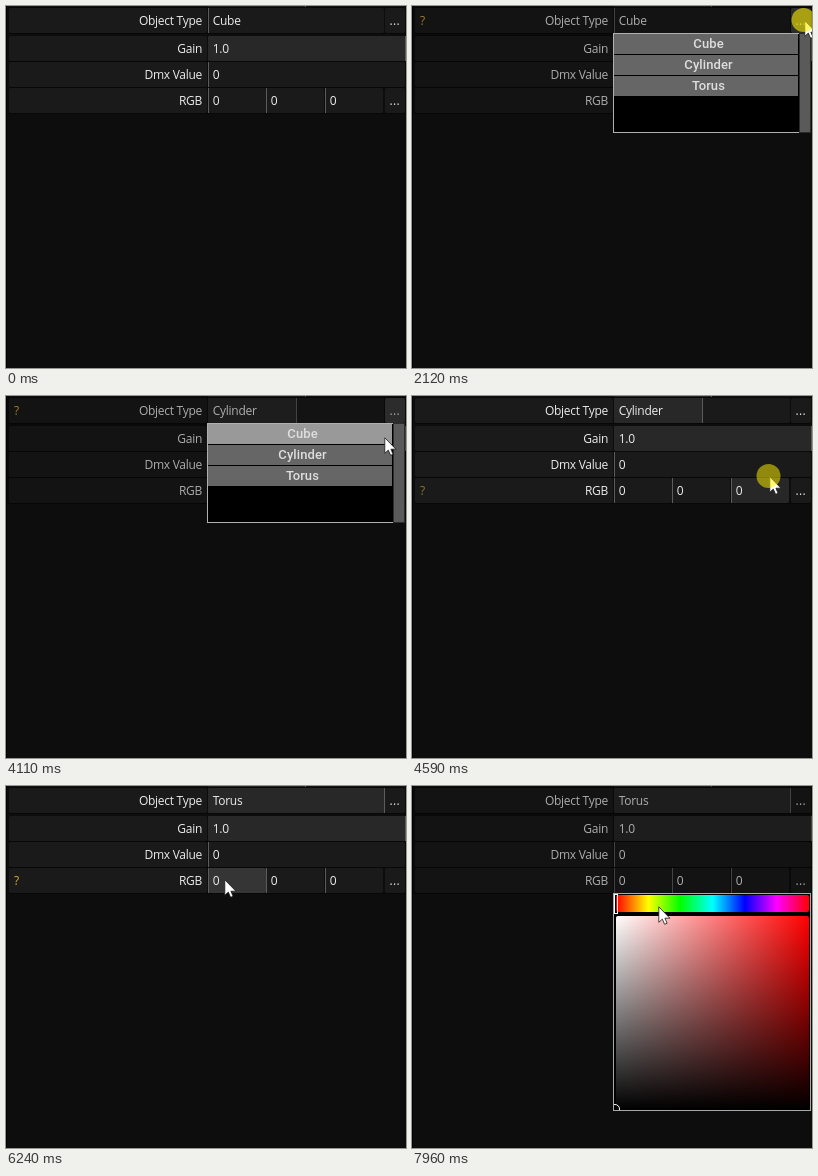
These frames come from a looping animation (400 by 362 pixels, 8 s). An HTML page:

```html
<!DOCTYPE html>
<html lang="en">
<head>
<meta charset="utf-8">
<title>Property panel</title>
<style>
  html, body { margin: 0; width: 100%; height: 100%; overflow: hidden; background: #0d0d0d; }
  svg { display: block; width: 400px; height: 362px; }
  text { font: 500 12px "Open Sans", "Noto Sans", sans-serif; letter-spacing: -.27px; fill: #ececec; }
  .label { text-anchor: end; }
  .help { fill: #dfab2f; }
  .dots { letter-spacing: .35px; }
  .item { font: 500 13px Roboto, sans-serif; letter-spacing: .1px; fill: #dedede; text-anchor: middle; }
</style>
</head>
<body>
<svg id="stage" viewBox="0 0 400 362">
  <defs>
    <linearGradient id="hue">
      <stop offset="0" stop-color="#f00"/><stop offset=".167" stop-color="#ff0"/>
      <stop offset=".333" stop-color="#0f0"/><stop offset=".5" stop-color="#0ff"/>
      <stop offset=".667" stop-color="#00f"/><stop offset=".833" stop-color="#f0f"/>
      <stop offset="1" stop-color="#f00"/>
    </linearGradient>
    <linearGradient id="sat"><stop offset="0" stop-color="#fff"/><stop offset="1" stop-color="#f00"/></linearGradient>
    <linearGradient id="val" x2="0" y2="1">
      <stop offset="0" stop-color="#000" stop-opacity="0"/><stop offset="1" stop-color="#000"/>
    </linearGradient>
    <clipPath id="pickerClip"><rect x="202" y="108" width="196" height="216"/></clipPath>
  </defs>
</svg>
<script>
const stage = document.getElementById('stage');
const LOOP = 8000, START = 610, TICK = 79.03;

function add(tag, attrs, parent = stage, content) {
  const el = document.createElementNS('http://www.w3.org/2000/svg', tag);
  for (const name in attrs) el.setAttribute(name, attrs[name]);
  if (content) el.textContent = content;
  return parent.appendChild(el);
}
const rect = (x, y, width, height, fill, parent, rx = 0) =>
  add('rect', { x, y, width, height, fill, rx }, parent);
const text = (x, y, content, cls, parent) => add('text', { x, y, class: cls }, parent, content);
const group = () => add('g', {});
const show = (el, on) => el.setAttribute('visibility', on ? 'visible' : 'hidden');
const fade = (el, amount) => el.setAttribute('opacity', amount);

// Panel rows
rect(0, 0, 1, 362, '#020202');
rect(3, 0, 396, 1, '#161616');
rect(202, 0, 97, 1, '#262626');
rect(299, 0, 1, 1, '#666');
rect(3, 1, 396, 1, '#070707');

const helps = [], fields = [];
let typeFill, typeLine, typeText;

function field(row, x, y, w, value, level) {
  rect(x, y, w, 25, '#1a1a1a', stage, 2);
  const fill = rect(x, y, w * level, 25, '#282828', stage, 1);
  const glow = rect(x, y, w, 25, '#353535', stage, 2);
  const line = rect(x + w * level, y, 1, 25, '#5c5c5c');
  const label = text(x + 4.7, y + 17, value, 'value');
  fields.push({ row, x, w, glow });
  return [fill, line, label];
}

function button(row, y) {
  rect(379, y, 20, 25, '#1a1a1a', stage, 2);
  fields.push({ row, x: 379, w: 21, glow: rect(379, y, 20, 25, '#3c3c3c', stage, 2) });
  text(383.5, y + 17, '...', 'dots');
}

const ROW_Y = [2, 30, 56, 82];
['Object Type', 'Gain', 'Dmx Value', 'RGB'].forEach((name, row) => {
  const y = ROW_Y[row];
  rect(3, y, 198, 25, '#1a1a1a', stage, 2);
  rect(3, y + 25, 396, 1, '#080808');
  text(196, y + 17, name, 'label');
  helps.push(text(8, y + 17, '?', 'help'));
});
[typeFill, typeLine, typeText] = field(0, 202, 2, 176, 'Cube', 0);
button(0, 2);
field(1, 202, 30, 197, '1.0', 1);
field(2, 202, 56, 197, '0', 0);
for (const x of [202, 260, 319]) field(3, x, 82, 58, '0', 0);
button(3, 82);

const dim = rect(0, 0, 400, 108, '#000');

// Drop-down list
const types = ['Cube', 'Cylinder', 'Torus'];
const menu = group();
rect(201, 27, 187, 100, '#b0b0b0', menu);
rect(202, 28, 185, 98, '#000', menu);
rect(387, 27, 12, 100, '#2c2c2c', menu);
rect(388, 28, 10, 98, '#5a5a5a', menu);
const items = types.map((name, i) => {
  const bar = rect(202, 28 + 21 * i, 184, 20, '#666', menu);
  text(296.5, 42 + 21 * i, name, 'item', menu);
  return bar;
});

// Colour picker
const picker = group();
rect(201, 107, 198, 218, '#a8a8a8', picker);
rect(202, 108, 196, 216, '#000', picker);
rect(204, 109, 193, 17, 'url(#hue)', picker, 2);
rect(204, 130, 193, 194, 'url(#sat)', picker, 2);
rect(204, 130, 193, 194, 'url(#val)', picker);
add('rect', { x: 202.5, y: 108.5, width: 3, height: 19, fill: 'none', stroke: '#fff' }, picker);
add('circle', { cx: 203, cy: 323, r: 4.5, fill: 'none', stroke: '#fff', 'clip-path': 'url(#pickerClip)' }, picker);

// Pointer with its click mark
const pointer = group();
add('path', {
  d: 'M.8.8V16.3L4.3 13.1 6.6 18.3 9.1 17.3 6.9 12.2H11.9Z',
  fill: '#fff', stroke: '#1a1a1a', 'stroke-width': .8
}, pointer);
const mark = add('circle', { cx: -.5, cy: 0, r: 12, fill: '#fff000' }, pointer);

// Pointer path: tick, x, y
const PATH = [
  [0, 4, 13], [10, 390, 15], [11, 391, 14], [15, 391, 14], [16, 392, 14],
  [24, 392, 14], [29, 366, 56], [32, 366, 56], [38, 390, 15], [41, 390, 15],
  [44, 378, 41], [48, 357, 80], [55, 357, 80], [56, 356, 80], [60, 356, 80],
  [71, 218, 93], [73, 216, 93], [75, 216, 93], [81, 390, 98], [88, 390, 98], [93, 246, 120]
];
const PRESSES = [18, 29, 39, 48, 83];

const between = (k, a, b) => k >= a && k < b;
const menuOpen = k => between(k, 18, 30) || between(k, 40, 49);
const pickerOpen = k => k >= 84;

function pointerAt(k) {
  const i = PATH.findIndex(p => p[0] >= k);
  if (i < 0) return PATH[PATH.length - 1].slice(1);
  if (i === 0) return PATH[0].slice(1);
  const [k0, x0, y0] = PATH[i - 1], [k1, x1, y1] = PATH[i];
  let u = (k - k0) / (k1 - k0);
  if (k1 - k0 > 5) u = u * u * (3 - 2 * u);
  return [Math.round(x0 + (x1 - x0) * u), Math.round(y0 + (y1 - y0) * u)];
}

function hoverAt(k) {
  if (k < 0 || k === 30 || k === 49) return { row: -1, x: 0 };
  if (menuOpen(k)) return { row: 0, x: 390 };
  const [x, y] = pointerAt(k);
  return { row: [28, 55, 80, 108].findIndex(end => y < end), x };
}

function draw(t) {
  const k = Math.floor((t - START) / TICK + .01);
  const [x, y] = pointerAt(k);

  // Highlights ease over two ticks and wait while the pointer rests
  const g = between(k, 50, 61) ? 50 : k;
  const hovers = [hoverAt(g), hoverAt(g - 1)];
  const share = test => hovers.filter(test).length / 2;
  helps.forEach((el, row) => fade(el, share(h => h.row === row) ** .7));
  for (const f of fields)
    fade(f.glow, share(h => h.row === f.row && h.x >= f.x && h.x <= f.x + f.w));

  const type = k < 32 ? 0 : k < 51 ? 1 : 2;
  typeText.textContent = types[type];
  typeFill.setAttribute('width', 88 * type);
  typeLine.setAttribute('x', 202 + 88 * type);

  const open = n => menuOpen(n) || pickerOpen(n);
  fade(dim, open(k) ? (open(k - 1) ? .27 : .14) : 0);
  show(menu, menuOpen(k));
  show(picker, pickerOpen(k));
  items.forEach((bar, i) => {
    const over = x < 386 && between(y, 28 + 21 * i, 49 + 21 * i);
    bar.setAttribute('fill', over ? '#999' : '#666');
  });

  show(pointer, k >= 0);
  pointer.setAttribute('transform', `translate(${x} ${y})`);
  const press = PRESSES.find(p => between(k, p, p + 3));
  fade(mark, press === undefined ? 0 : [.66, .59, .52][k - press]);
}

const begin = performance.now();
function frame() {
  draw((performance.now() - begin) % LOOP);
  requestAnimationFrame(frame);
}
frame();
</script>
</body>
</html>
```
